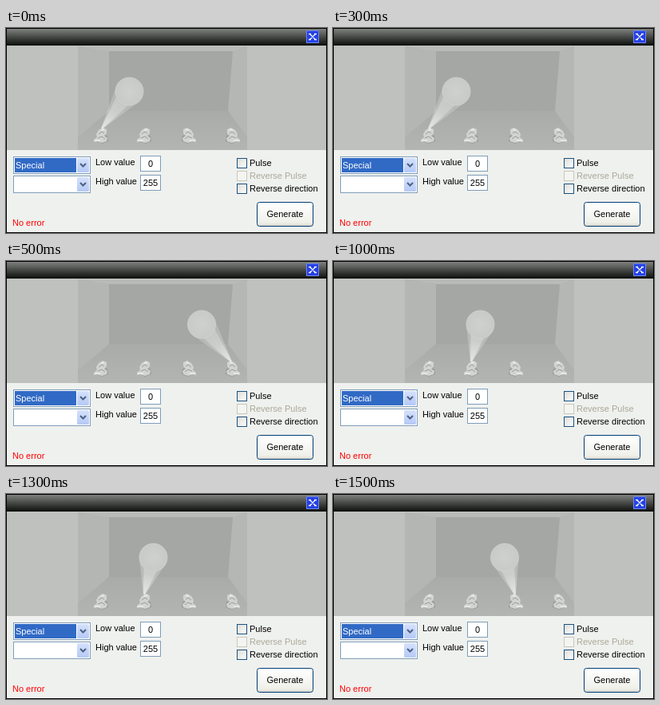
An HTML page that plays this animation: 402x257 px, repeating every 2000 ms.

```html
<!DOCTYPE html>
<html lang="en">
<head>
<meta charset="utf-8">
<style>
html, body { margin: 0; width: 100%; height: 100%; overflow: hidden; background: #eff1ee; }
svg { display: block; width: 402px; height: 257px; font: 11px "Liberation Sans", Arial, sans-serif; }
.field { fill: #fff; stroke: #7f9db9; }
.check { fill: url(#check); stroke: #1c5180; }
</style>
</head>
<body>
<svg viewBox="0 0 402 257">
  <defs>
    <linearGradient id="title" x2="0" y2="1">
      <stop stop-color="#858785"/><stop offset=".5" stop-color="#484a48"/><stop offset="1" stop-color="#0c0e0c"/>
    </linearGradient>
    <linearGradient id="arrow" x2="0" y2="1">
      <stop stop-color="#d5e1fd"/><stop offset="1" stop-color="#b5c9f5"/>
    </linearGradient>
    <linearGradient id="push" x2="0" y2="1">
      <stop stop-color="#fff"/><stop offset=".85" stop-color="#f0f0ea"/><stop offset="1" stop-color="#d8d4ca"/>
    </linearGradient>
    <linearGradient id="check" x2="1" y2="1">
      <stop stop-color="#dcdcd7"/><stop offset="1" stop-color="#fff"/>
    </linearGradient>
    <linearGradient id="floor" x2="0" y2="1">
      <stop stop-color="#a9aba8"/><stop offset="1" stop-color="#b3b5b2"/>
    </linearGradient>
    <radialGradient id="light" gradientUnits="userSpaceOnUse" cx="0" cy="0" r="58">
      <stop stop-color="#eef0ed"/><stop offset=".45" stop-color="#d2d4d1"/><stop offset="1" stop-color="#c5c7c4"/>
    </radialGradient>
    <radialGradient id="spot">
      <stop stop-color="#cfd1ce"/><stop offset="1" stop-color="#c8cac7"/>
    </radialGradient>
    <g id="lamp">
      <path fill="#9a9c99" d="M-7 13L-2 6 8 7 9 14 1 17z"/>
      <path fill="#d2d4d1" d="M-3 0L2-3 7-1 7 4 4 7 8 10 7 14 1 16-5 14-9 15-9 12-5 9-6 5z"/>
      <path fill="none" stroke="#989a97" d="M-3 5L1 2 4 4M-4 10L1 8 5 11"/>
      <path fill="none" stroke="#eceeeb" stroke-width="1.5" d="M0 0L4-1M-8 13L-1 13"/>
    </g>
    <g id="combo">
      <rect class="field" x=".5" y=".5" width="96" height="21"/>
      <rect x="80" y="2" width="15" height="18" rx="1.5" fill="url(#arrow)"/>
      <path d="M84 9l3.5 3.5L91 9" fill="none" stroke="#4d6185" stroke-width="2"/>
    </g>
  </defs>

  <rect width="402" height="257" fill="#eff1ee"/>
  <rect y="22" width="402" height="131" fill="#bfc1be"/>
  <path d="M90 23H302V153H90z" fill="#b4b6b3"/>
  <path d="M90 23H302L284 29H129z" fill="#b9bbb8"/>
  <path d="M90 23L129 29V104L90 137z" fill="#b4b6b3"/>
  <path d="M302 23L284 29L278 104L302 137z" fill="#b5b7b4"/>
  <path d="M129 29H284L278 104H129z" fill="#a5a7a4"/>
  <path d="M129 104H278L302 137V153H90V137z" fill="url(#floor)"/>
  <use href="#lamp" x="119" y="128"/>
  <use href="#lamp" x="173" y="128"/>
  <use href="#lamp" transform="translate(229 128) scale(-1 1)"/>
  <use href="#lamp" transform="translate(284 128) scale(-1 1)"/>
  <g id="beam">
    <path fill="url(#light)" opacity=".45"/>
    <path fill="url(#light)" opacity=".75"/>
    <circle r="17.5" fill="url(#spot)" stroke="#d3d5d2" stroke-width=".7"/>
  </g>

  <rect width="402" height="22" fill="url(#title)"/>
  <rect x="376.5" y="3.5" width="15" height="15" fill="#2440e6" stroke="#7088ee"/>
  <path d="M380.5 7.5l7 7m0-7l-7 7M379 7.5h3m4 0h3M379 14.5h3m4 0h3" stroke="#fff" stroke-width="1.3"/>

  <use href="#combo" x="9" y="161"/>
  <use href="#combo" x="9" y="185"/>
  <rect x="11" y="163" width="77" height="18" fill="#316ac5"/>
  <text x="12" y="176" fill="#fff">Special</text>

  <text x="112" y="172">Low value</text>
  <text x="112" y="196">High value</text>
  <rect class="field" x="168.5" y="160.5" width="25" height="19"/>
  <rect class="field" x="168.5" y="184.5" width="25" height="19"/>
  <text x="181" y="174" text-anchor="middle">0</text>
  <text x="181" y="198" text-anchor="middle">255</text>

  <rect class="check" x="289.5" y="163.5" width="12" height="12"/>
  <rect x="289.5" y="179.5" width="12" height="12" fill="#f4f5f2" stroke="#cac8bb"/>
  <rect class="check" x="289.5" y="195.5" width="12" height="12"/>
  <text x="305" y="173">Pulse</text>
  <text x="305" y="189" fill="#aca899">Reverse Pulse</text>
  <text x="305" y="205">Reverse direction</text>

  <rect x="314.5" y="218.5" width="70" height="30" rx="3" fill="url(#push)" stroke="#003c74"/>
  <text x="349.5" y="237" text-anchor="middle">Generate</text>
  <text x="8" y="248" fill="#f00">No error</text>
  <rect x=".5" y=".5" width="401" height="256" fill="none" stroke="#000"/>
</svg>
<script>
const beam = document.getElementById("beam");
const [halo, core, disc] = beam.children;
const poses = [[120, 154.5], [282, 245], [173, 184.5], [228, 215]]; // lamp x, spot x
const lampY = 126, spotY = 79.5, radius = 17.5;

function draw(now) {
  const [lampX, spotX] = poses[Math.floor(now / 500) % poses.length];
  const dx = spotX - lampX, dy = spotY - lampY;
  const length = Math.hypot(dx, dy);
  const tangentX = length - radius * radius / length;
  const tangentY = radius * Math.sqrt(1 - (radius / length) ** 2);
  const cone = width => `M0-1L${tangentX} ${-width}V${width}L0 1z`;
  beam.setAttribute("transform", `translate(${lampX} ${lampY}) rotate(${Math.atan2(dy, dx) * 180 / Math.PI})`);
  halo.setAttribute("d", cone(tangentY));
  core.setAttribute("d", cone(tangentY * 0.65));
  disc.setAttribute("cx", length);
}

const start = performance.now();
function tick() {
  draw(performance.now() - start);
  requestAnimationFrame(tick);
}
tick();
</script>
</body>
</html>
```
